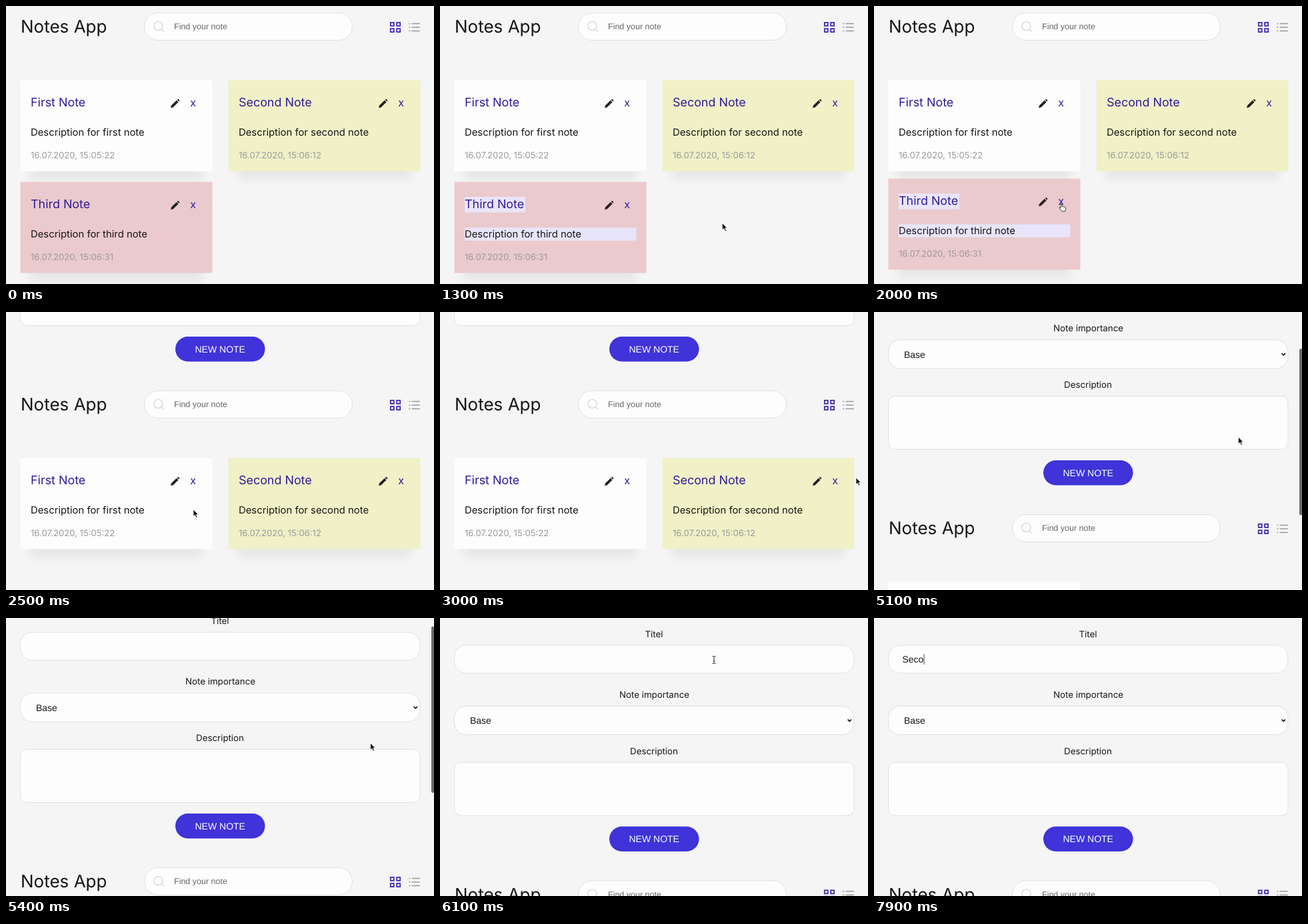
An HTML page that plays this animation: 642 by 418 pixels, repeating every 8 s.

```html
<!DOCTYPE html>
<html lang="en">
<head>
<meta charset="utf-8">
<title>Notes App</title>
<style>
  html, body { margin: 0; height: 100%; overflow: hidden; background: #f5f5f5; }
  svg { display: block; width: 100vw; height: 100vh; }
  text { font-family: Inter, "Open Sans", sans-serif; fill: #161616; text-rendering: geometricPrecision; white-space: pre; }
  .arial { font-family: "Liberation Sans", Arial, sans-serif; font-size: 14px; }
  .label { font-size: 13.3px; text-anchor: middle; }
  .title { font-size: 17.9px; fill: #2f1b98; }
  .desc { font-size: 14.85px; }
  .date { font-size: 13.1px; fill: #999; }
  .field { fill: #fdfdfd; stroke: #e0e0e0; }
</style>
</head>
<body>
<svg viewBox="0 0 642 418">
  <defs>
    <filter id="blur" x="-20%" y="-50%" width="140%" height="200%"><feGaussianBlur stdDeviation="7"/></filter>
  </defs>
  <g id="page">
    <text class="label" x="321" y="28.5">Titel</text>
    <rect class="field" x="21.5" y="41" width="599.5" height="42" rx="18"/>
    <text id="typed" class="arial" x="42.5" y="67"></text>
    <rect id="caret" y="54.5" width="1" height="15.5" fill="#444"/>

    <text class="label" x="321.5" y="119.7">Note importance</text>
    <rect class="field" x="21.5" y="132.3" width="599.5" height="43.2" rx="18"/>
    <text class="arial" x="45" y="159">Base</text>
    <path d="M611.6 152.6l2.7 2.7 2.7-2.7" fill="none" stroke="#111" stroke-width="1.6"/>

    <text class="label" x="321" y="204.5">Description</text>
    <rect class="field" x="21.5" y="217" width="599.5" height="80" rx="10"/>

    <rect x="254" y="313.5" width="134.5" height="37.5" rx="18.75" fill="#3f33d9"/>
    <text class="arial" x="321.2" y="337" text-anchor="middle" style="fill:#fff">NEW NOTE</text>

    <text x="22" y="424.7" font-size="26">Notes App</text>
    <rect class="field" x="207.5" y="395" width="312" height="41" rx="20.5"/>
    <g fill="none" stroke="#d2d2d2" stroke-width="1.2">
      <circle cx="228.5" cy="414.6" r="6.6"/><path d="M233.2 419.3l4 4"/>
    </g>
    <text class="arial" x="252" y="419.6" style="font-size:12.5px;fill:#666">Find your note</text>
    <path d="M576.8 409.3h5v5h-5zM586.2 409.3h5v5h-5zM576.8 418.7h5v5h-5zM586.2 418.7h5v5h-5z"
      fill="none" stroke="#4327b2" stroke-width="1.8"/>
    <path d="M604.3 411h2m2.4 0h12M604.3 416.5h2m2.4 0h12M604.3 422h2m2.4 0h12"
      stroke="#999" stroke-width="1.5"/>
    <g id="cards"></g>
  </g>
  <rect id="bar" x="638" width="5" height="250" rx="2" fill="#6c6c6c"/>
  <path id="arrow" d="M0 0v10.4l2.4-2.2 1.8 4 1.8-.8-1.7-3.8h3.3z" fill="#111" stroke="#fff" stroke-width=".8"/>
  <path id="hand" d="M-1 1q1-1.3 2 0v4l1.2-.4 1.3.4 1.2.1 1.3.5q.8.4.7 1.4l-.6 2.6-.7 2.2h-4.6l-1.6-2.4-2.2-2.6q-.4-1.4.8-1.2l1.2 1z"
    fill="#fff" stroke="#222" stroke-width=".9"/>
  <path id="beam" d="M-2.5-5.5q2 0 2.5 1 .5-1 2.5-1M0-4.5v9M-2.5 5.5q2 0 2.5-1 .5 1 2.5 1M-1.2 1.8h2.4"
    fill="none" stroke="#222"/>
</svg>
<script>
const $ = id => document.getElementById(id);
const show = (el, on) => el.style.display = on ? "" : "none";
const move = (el, x, y) => el.setAttribute("transform", `translate(${x} ${y})`);

const addCard = (id, x, y, fill, name, time, selection = "") => {
  $("cards").innerHTML += `<g id="${id}">
    <rect x="${x + 14}" y="${y + 30}" width="260" height="120" fill="#000" opacity=".055" filter="url(#blur)"/>
    <rect x="${x}" y="${y}" width="288" height="137" fill="${fill}"/>
    <g transform="translate(${x + 15.5} ${y})">
      ${selection}
      <text class="title" y="39.7">${name} Note</text>
      <path transform="translate(216.5 35.3)" fill="#222"
        d="M-6.5 6.5l1-3.8L2.4-5.1 5.1-2.4-2.7 5.5zM3.2-5.8l.8-.8q.7-.5 1.4 0l1.2 1.2q.5.7 0 1.4l-.8.8z"/>
      <text class="title" x="239.3" y="39.5" style="font-size:16px">x</text>
      <text class="desc" y="83.2">Description for ${name.toLowerCase()} note</text>
      <text class="date" y="117.7">16.07.2020, ${time}</text>
    </g></g>`;
};
addCard("first", 21.5, 496, "#fdfdfd", "First", "15:05:22");
addCard("second", 333.5, 496, "#f0f1c7", "Second", "15:06:12");
addCard("third", 21.5, 649, "#ebcacd", "Third", "15:06:31",
  `<path id="selection" fill="#e8e5fb" d="M0 22.5h91v23.5h-91zM0 68.7h257.5v19.5h-257.5z"/>`);

// Linear interpolation over [time, value, ...] rows
const track = (rows, t) => {
  const i = rows.findIndex(r => r[0] > t);
  if (i < 0) return rows[rows.length - 1].slice(1);
  if (!i) return rows[0].slice(1);
  const a = rows[i - 1], b = rows[i], k = (t - a[0]) / (b[0] - a[0]);
  return a.slice(1).map((v, j) => v + (b[j + 1] - v) * k);
};
const pointer = [
  [100, 553, 36], [300, 532, 210], [500, 500, 343], [1100, 500, 343],
  [1400, 385, 318], [1600, 305, 302], [1800, 281, 297], [2500, 281, 297],
  [2800, 480, 265], [3000, 624, 249], [3300, 597, 257], [3500, 592, 255],
  [4300, 592, 255], [4500, 546.5, 188], [5700, 546.5, 188], [6100, 411, 63]
];
const scroll = [
  [4800, 276.5], [4900, 235], [5000, 160], [5100, 90.5],
  [5200, 54], [5300, 31], [5500, 8], [5700, 0]
];
const keys = [7200, 7400, 7600, 7900];
const lift = (t, start) => {
  const k = Math.min(1, Math.max(0, (t - start) / 300));
  return -5 * k * (2 - k);
};

function draw(t) {
  const top = t < 2500 ? 384.5 : track(scroll, t)[0];
  move($("page"), 0, -top);
  move($("third"), 0, lift(t, 1500));
  move($("second"), 0, lift(t, 3000));
  show($("third"), t < 2500);
  show($("second"), t < 4100);
  show($("selection"), t >= 400);

  $("bar").setAttribute("y", 1 + top * 0.6);
  $("bar").setAttribute("opacity", t < 4900 ? 0 : Math.min(1, Math.max(0, (6100 - t) / 400)));

  const typed = $("typed");
  typed.textContent = "Seco".slice(0, keys.filter(k => t >= k).length);
  $("caret").setAttribute("x", 42.6 + typed.getComputedTextLength());
  show($("caret"), t >= 6500 && t < 7000 || t >= 7200);

  const onButton = t >= 1800 && t < 2500 || t >= 3400 && t < 4100;
  const shape = onButton ? "hand" : t >= 6100 ? "beam" : "arrow";
  const [x, y] = track(pointer, t);
  for (const id of ["arrow", "hand", "beam"]) {
    move($(id), x, y);
    show($(id), id === shape && t >= 100 && t < 7200);
  }
}

const start = performance.now();
function tick() {
  // The screen updates ten times a second
  draw(Math.floor((performance.now() - start) % 8000 / 100) * 100);
  requestAnimationFrame(tick);
}
tick();
</script>
</body>
</html>
```
